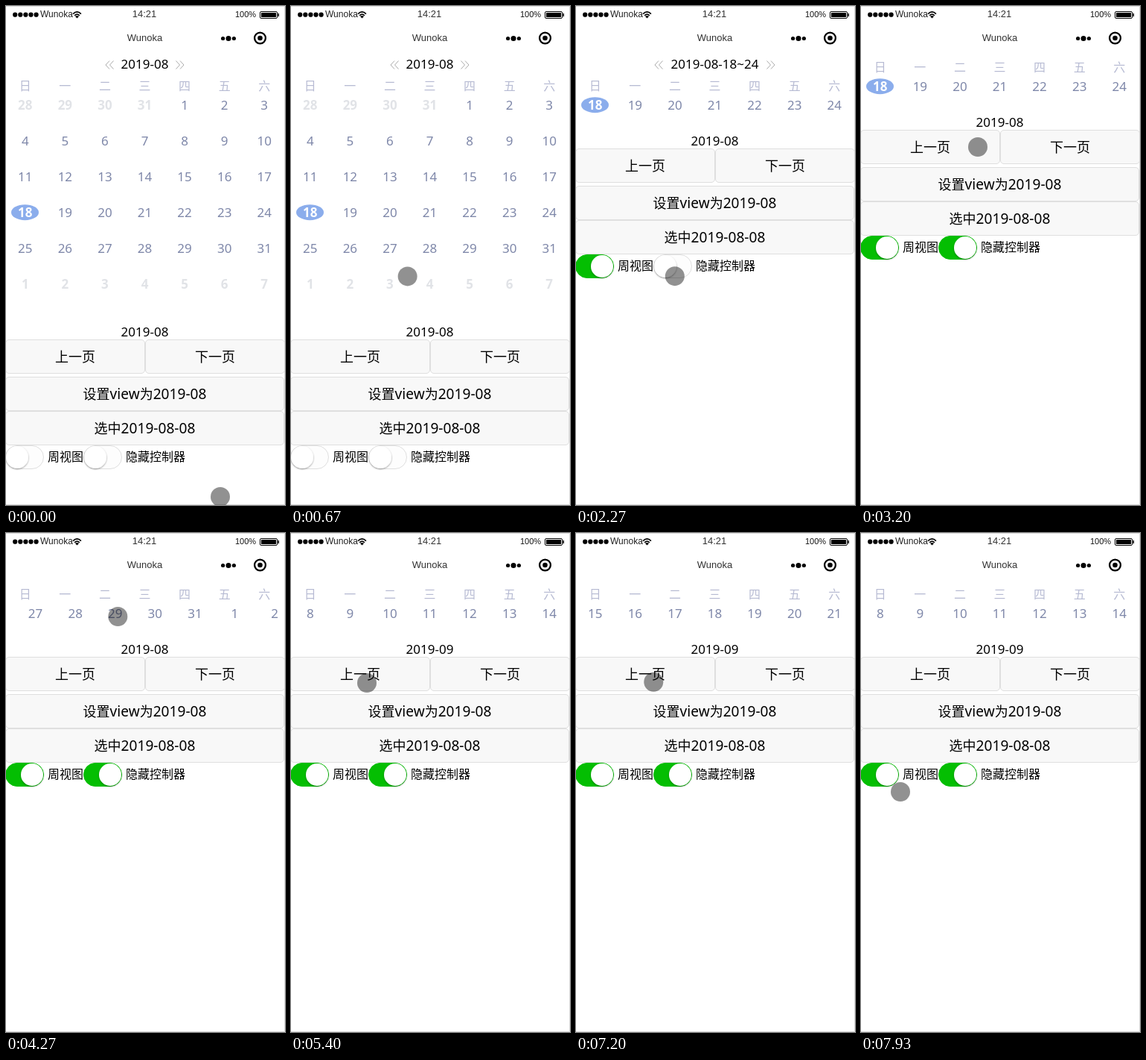
These frames come from a looping animation (375x669 px, 8000 ms). An HTML page:

```html
<!DOCTYPE html>
<html lang="zh-CN">
<head>
<meta charset="utf-8">
<title>Calendar demo</title>
<style>
  html, body { margin: 0; width: 100%; height: 100%; overflow: hidden; background: #fff; }
  svg { display: block; width: 100%; height: 100%; }
  text { font-family: "Noto Sans", "Noto Sans CJK SC", "Noto Sans CJK", sans-serif; white-space: pre; }
  .sys { font-family: "Liberation Sans", Arial, sans-serif; }
  .day { font-size: 17px; font-weight: 500; fill: #7e87a9; }
  .day.out { font-weight: 600; fill: #e1e3e7; }
  .day.on { font-weight: 700; fill: #fff; }
</style>
</head>
<body>
<svg id="stage" viewBox="0 0 375 669"></svg>
<script>
const LOOP = 8000, FPS = 15, W = 375, COL = W / 7, MID = 186.5;
const stage = document.getElementById('stage');

function add(parent, tag, attrs = {}, content) {
  const el = document.createElementNS('http://www.w3.org/2000/svg', tag);
  for (const k in attrs) el.setAttribute(k, attrs[k]);
  if (content !== undefined) el.textContent = content;
  parent.append(el);
  return el;
}
const group = parent => add(parent, 'g');
const move = (el, x, y) => el.setAttribute('transform', `translate(${x} ${y})`);
const show = (el, on) => el.setAttribute('display', on ? 'inline' : 'none');

// Latin runs are set slightly larger than the Chinese characters around them.
function label(parent, x, y, size, str, attrs = {}) {
  const el = add(parent, 'text', { x, y, 'text-anchor': 'middle', ...attrs });
  for (const run of str.match(/[\x20-\x7e]+|[^\x20-\x7e]+/g)) {
    const latin = run.charCodeAt(0) < 128;
    add(el, 'tspan', { 'font-size': latin ? size * 1.0625 : size }, run);
  }
  return el;
}

function dayCell(parent, col, y, date, kind = '') {
  const x = 25.8 + col * COL;
  if (kind === 'on') add(parent, 'ellipse', { cx: x - .3, cy: y - 6.3, rx: 18.5, ry: 10.5, fill: '#8badec' });
  add(parent, 'text', { x, y, 'text-anchor': 'middle', class: 'day ' + kind }, date);
}

function statusBar() {
  const g = group(stage);
  const sys = (x, y, size, str, fill, anchor = 'middle') =>
    add(g, 'text', { x, y, 'font-size': size, fill, 'text-anchor': anchor, class: 'sys' }, str);
  for (let i = 0; i < 5; i++) add(g, 'circle', { cx: 12.2 + i * 7.1, cy: 11.7, r: 3.1 });
  sys(46, 15, 12, 'Wunoka', '#222', 'start');
  for (const [r, y] of [[5.4, 10.6], [3.3, 12.8]])
    add(g, 'path', { d: `M${95.5 - r} ${y}Q95.5 ${y - r} ${95.5 + r} ${y}`, fill: 'none', stroke: '#000', 'stroke-width': 1.7 });
  add(g, 'path', { d: 'M93 13.9Q95.5 12 98 13.9L95.5 16.4Z' });
  sys(186, 15, 13, '14:21', '#333');
  sys(308, 15, 11, '100%', '#111', 'start');
  add(g, 'rect', { x: 341.5, y: 7.5, width: 23, height: 9, rx: 1.5, fill: 'none', stroke: '#000' });
  add(g, 'rect', { x: 343, y: 9, width: 20, height: 6, rx: .5 });
  add(g, 'rect', { x: 365.5, y: 10, width: 1.5, height: 4 });

  sys(MID, 47, 13, 'Wunoka', '#333');
  for (const i of [-1, 0, 1]) add(g, 'circle', { cx: 299 + 7.4 * i, cy: 43.5, r: i ? 2.6 : 3.5 });
  add(g, 'circle', { cx: 341.5, cy: 43, r: 7.4, fill: 'none', stroke: '#000', 'stroke-width': 2.3 });
  add(g, 'circle', { cx: 341.5, cy: 43, r: 3.3 });
}

function controller(str, gap) {
  const g = group(stage);
  label(g, MID, 84, 16, str);
  for (const side of [-1, 1])
    for (const inset of [0, 5.5]) {
      const x = MID + side * (gap - inset);
      add(g, 'path', { d: `M${x} 73.5l${side * 5} 5.5l${-side * 5} 5.5`, fill: 'none', stroke: '#aaa' });
    }
  return g;
}

function button(parent, x, y, width, str) {
  add(parent, 'rect', { x, y, width, height: 45, rx: 4.5, fill: '#f8f8f8', stroke: '#dfdfdf' });
  label(parent, x + width / 2, y + 29.5, 18, str);
}

function toggle(parent, x, str) {
  const track = add(parent, 'rect', { x: x + .5, y: 589.5, width: 51, height: 31, rx: 15.5 });
  const knob = add(parent, 'circle', { cx: x + 16, cy: 605, r: 15, fill: '#fff', filter: 'url(#shade)' });
  label(parent, x + 57, 610, 16, str, { 'text-anchor': 'start' });
  return age => {
    track.setAttribute('fill', age > 0 ? '#04be02' : '#fdfdfd');
    track.setAttribute('stroke', age > 0 ? '#04be02' : '#dfdfdf');
    move(knob, 20 * easeOut(age / 300, 3), 0);
  };
}

// --- build ---
const shade = add(add(stage, 'defs'), 'filter', { id: 'shade', x: '-20%', y: '-20%', width: '140%', height: '150%' });
add(shade, 'feDropShadow', { dx: 0, dy: 1, stdDeviation: 1.3, 'flood-opacity': .4 });

add(stage, 'rect', { width: W, height: 669, fill: '#fff' });
statusBar();
const monthBar = controller('2019-08', 47.5);
const weekBar = controller('2019-08-18~24', 75.5);

const calendar = group(stage);
[...'日一二三四五六'].forEach((c, i) => label(calendar, 25.8 + i * COL, 113, 16, c, { fill: '#b7bbd3' }));

const monthGrid = group(calendar), weekStrip = group(calendar);
for (let i = 0; i < 42; i++) {
  const day = new Date(Date.UTC(2019, 6, 28 + i)), date = day.getUTCDate();
  const kind = day.getUTCMonth() !== 7 ? 'out' : date === 18 ? 'on' : '';
  dayCell(monthGrid, i % 7, 139 + 48 * Math.floor(i / 7), date, kind);
}
for (let i = 0; i < 35; i++)
  dayCell(weekStrip, i, 139, new Date(Date.UTC(2019, 7, 18 + i)).getUTCDate(), i ? '' : 'on');

const panel = group(stage);
const months = ['2019-08', '2019-09'].map(s => label(panel, MID, 443, 16, s));
button(panel, -.5, 447.5, 187, '上一页');
button(panel, 187.5, 447.5, 187, '下一页');
button(panel, -.5, 497.5, 374, '设置view为2019-08');
button(panel, -.5, 543.5, 374, '选中2019-08-08');
const weekToggle = toggle(panel, -1, '周视图');
const hideToggle = toggle(panel, 104, '隐藏控制器');

add(stage, 'path', { d: 'M0 .5H374.5V668.5H0', fill: 'none', stroke: '#dcdcdc' });
const dot = add(stage, 'circle', { r: 13, fill: '#000', 'fill-opacity': .43 });
const arrow = add(stage, 'path', {
  d: 'M0 0V16L3.7 12.5L6.3 18.3L8.7 17.2L6.2 11.6H11.3Z', fill: '#fff', stroke: '#000'
});

// --- motion ---
const WEEK_AT = 1330, HIDE_AT = 2790;
const SWIPE_AT = 3790, SWIPE_GAP = 430, LAST_SWIPE = SWIPE_AT + 2 * SWIPE_GAP;
const PREV_AT = [5430, 7450], NEXT_AT = [6147, 6800];
const TURN = 350, TRAVEL = 550;

// Where the pointer arrives, and when.
const stops = [
  [0, 288, 658], [550, 175, 323], [1060, 37, 619], [1400, 39, 624], [2140, 151, 360], [2333, 126, 363],
  [3200, 157, 189], [SWIPE_AT, 185, 112], [LAST_SWIPE, 185, 112], [5350, 102, 201], [6130, 284, 191],
  [7250, 100, 200], [7930, 53, 347]
];

function clamp(v) { return Math.min(1, Math.max(0, v)); }
function easeOut(p, power) { return 1 - (1 - clamp(p)) ** power; }
const smooth = p => p * p * (3 - 2 * p);

function pageAt(t) {
  const turned = at => easeOut((t - at) / TURN, 2);
  let page = 0;
  for (let at = SWIPE_AT; at <= LAST_SWIPE; at += SWIPE_GAP) page += turned(at);
  for (const at of NEXT_AT) page += turned(at);
  for (const at of PREV_AT) page -= turned(at);
  return page;
}

function pointerAt(t) {
  let [, x, y] = stops[0];
  for (let i = 1; i < stops.length; i++) {
    const [at, toX, toY] = stops[i];
    const span = Math.min(TRAVEL, at - stops[i - 1][0]);
    const p = smooth(clamp((t - at + span) / span));
    x += (toX - x) * p;
    y += (toY - y) * p;
  }
  // The finger swings left with every swipe and back again.
  if (t > SWIPE_AT && t < LAST_SWIPE) x -= 55 * Math.sin(2 * Math.PI * (t - SWIPE_AT) / SWIPE_GAP);
  return [x, y];
}

function draw(t) {
  const week = t >= WEEK_AT, hidden = t >= HIDE_AT, lift = hidden ? -25 : 0;
  show(monthBar, !week);
  show(weekBar, week && !hidden);
  show(monthGrid, !week);
  show(weekStrip, week);
  move(calendar, 0, lift);
  move(panel, 0, lift - (week ? 256 : 0));
  weekToggle(t - WEEK_AT);
  hideToggle(t - HIDE_AT);

  const page = pageAt(t);
  move(weekStrip, -W * page, 0);
  months.forEach((el, i) => show(el, i === +(page > 1.9)));

  const [x, y] = pointerAt(t);
  const arrowOn = t >= 6100 && t < NEXT_AT[1];
  show(dot, !arrowOn);
  show(arrow, arrowOn);
  move(dot, x, y);
  move(arrow, x - .5, y + .5);
}

// The screen updates in steps of 1/15 s.
function tick() {
  const t = performance.now() % LOOP;
  draw(Math.floor((t + 5) * FPS / 1000) * 1000 / FPS % LOOP);
  requestAnimationFrame(tick);
}
tick();
</script>
</body>
</html>
```
